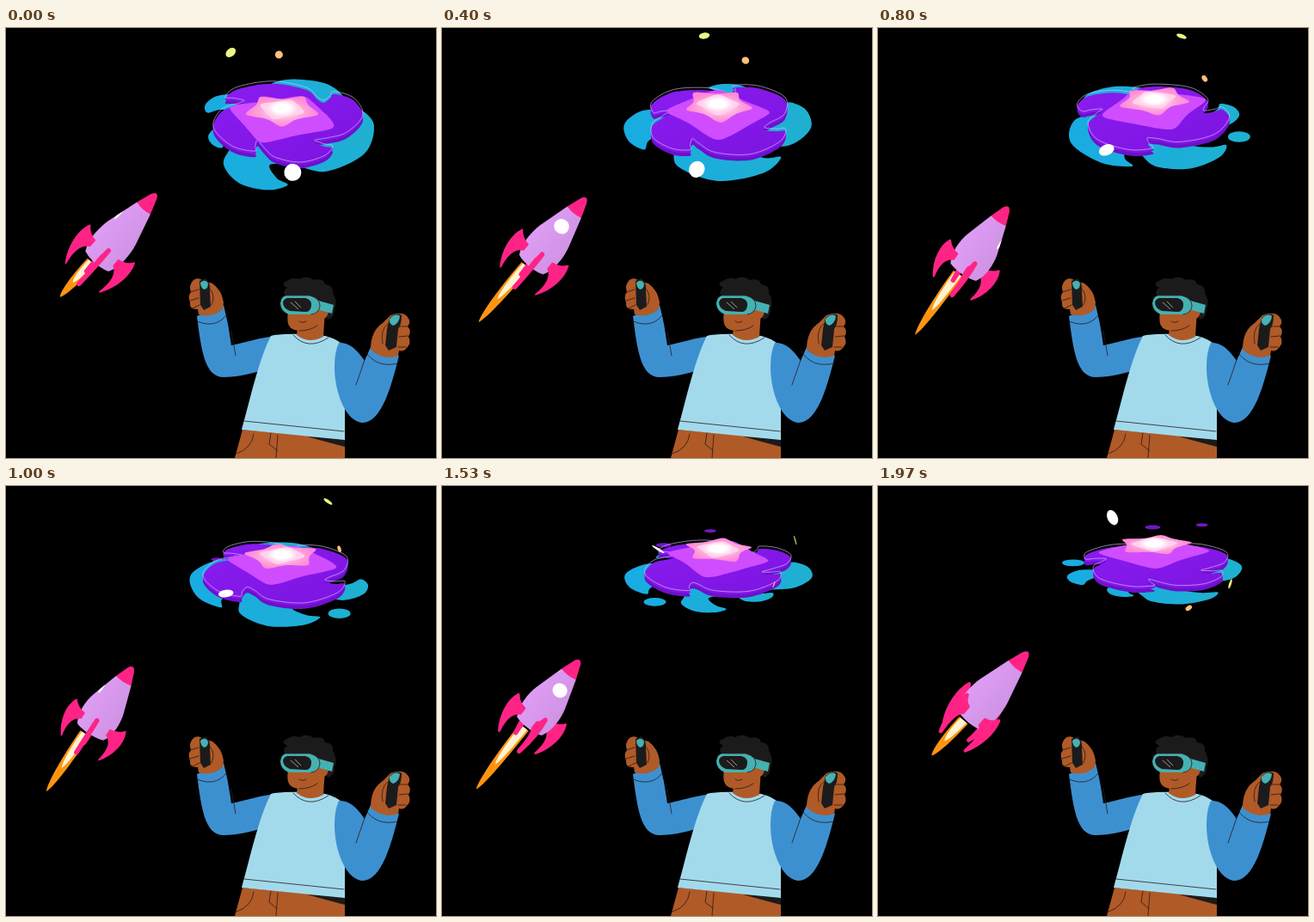
These frames come from a looping animation (500 by 500 pixels, 2.01 s). An HTML page:

```html
<!DOCTYPE html>
<html lang="en">
<head>
<meta charset="utf-8">
<title>Virtual space</title>
<style>
html, body { margin: 0; width: 100%; height: 100%; overflow: hidden; background: #000; }
svg { display: block; width: 100%; height: 100%; }
.line { fill: none; stroke: #2b1a1a; stroke-width: .8; stroke-linecap: round; stroke-linejoin: round; }
.skin { fill: #b05a27; }
.sleeve { fill: #3d90d0; }
.dark { fill: #1c1b1c; }
.teal { fill: #45b1b2; }
.fin { fill: #ff2386; stroke: #ff2386; stroke-linejoin: round; }
</style>
</head>
<body>
<svg viewBox="0 0 500 500">
  <defs>
    <linearGradient id="cyan" x1="0" y1="0" x2="1" y2="0">
      <stop offset="0" stop-color="#18ace2"/><stop offset="1" stop-color="#1fb0d0"/>
    </linearGradient>
    <linearGradient id="purple" x1="0" y1="0" x2="1" y2="1">
      <stop offset="0" stop-color="#8a1cf0"/><stop offset="1" stop-color="#7c14e0"/>
    </linearGradient>
    <radialGradient id="pink">
      <stop offset=".2" stop-color="#ffdcf0"/><stop offset=".6" stop-color="#ffa6dc"/><stop offset="1" stop-color="#ff86d4"/>
    </radialGradient>
    <radialGradient id="core">
      <stop offset=".5" stop-color="#fff"/><stop offset="1" stop-color="#fff" stop-opacity="0"/>
    </radialGradient>
    <linearGradient id="paint" x1="0" y1="0" x2="0" y2="1">
      <stop offset="0" stop-color="#de9cf4"/><stop offset="1" stop-color="#cf93e4"/>
    </linearGradient>
    <path id="hull" d="M0-18C12-25 30-24 42-21L78-10.500V10.500L42 21C30 24 12 25 0 18C-4 10-4-10 0-18Z"/>
    <clipPath id="hullClip"><use href="#hull"/></clipPath>
  </defs>

  <g id="galaxy">
    <ellipse id="driftA" rx="7" ry="2" fill="#6f17c4"/>
    <ellipse id="driftB" rx="9" ry="2.5" fill="#6f17c4"/>
    <path id="arms" fill="url(#cyan)"/>
    <path id="rim" fill="#6d10cc" transform="translate(0 4)"/>
    <path id="disc" fill="url(#purple)"/>
    <path id="edge" fill="none" stroke="#e6ccff" opacity=".6" transform="translate(0 -3)"/>
    <path id="cloud" fill="#cf4dff"/>
    <path id="glow" fill="url(#pink)"/>
    <path id="haze" fill="#ffd3ec"/>
    <ellipse id="heart" cx="321" rx="18" fill="url(#core)"/>
    <ellipse id="whiteMoon" fill="#fff"/>
    <ellipse id="yellowMoon" fill="#ebf587"/>
    <ellipse id="orangeMoon" fill="#ffc07c"/>
  </g>

  <g id="jet">
    <path id="flame" fill="#ff9412"/>
    <path id="flameCore" fill="#fff3cf"/>
  </g>
  <g id="rocket">
    <g id="backFins"></g>
    <use href="#hull" fill="url(#paint)"/>
    <g clip-path="url(#hullClip)"><ellipse id="port" cx="56" rx="8.5" fill="#fff"/></g>
    <path d="M78-10.500L95-4.500Q104 0 95 4.500L78 10.500Q75 0 78-10.500Z" fill="#ff2386"/>
    <g id="frontFins"></g>
  </g>

  <g id="player">
    <path class="skin" d="M275 467L266 500H394V478Z"/>
    <path class="dark" d="M350 475L394 478V487L368 480Z"/>
    <path class="line" d="M288 472Q286 489 268 495M308 471L306 484L315 491M316 473L314 500"/>
    <path class="sleeve" d="M222 335C227 374 231 406 253 406C270 406 284 402 298 398L314 358C294 360 278 366 262 369Q259 345 253 322Z"/>
    <path d="M312 357Q340 354 371 358Q381 360 392 368L384 410L394 442V479L274 467C284 432 293 388 308 358Z" fill="#a2daec"/>
    <path class="sleeve" d="M387 366C400 366 407 373 417 387L424 371L457 381C449 412 438 459 414 459C395 457 382 424 382 394Q382 377 387 366Z"/>
    <path class="line" d="M262 352L267 381M417 386L407 415M222 341Q244 350 256 334M418 376Q430 396 456 390M277 457L393 469"/>
    <path class="skin" d="M340 342L338 357Q352 368 369 359L371 328Z"/>
    <path class="line" d="M334 357Q351 376 375 360"/>
    <path class="skin" d="M328 329C326 344 328 351 341 352Q356 352 365 343L379 328L372 320L330 322Z"/>
    <path class="line" d="M341 341Q345 344 349 341M341 352Q354 352 362 346"/>
    <path class="dark" d="M326 313Q320 306 327 302Q318 297 327 294Q333 289 341 292Q350 287 358 293Q369 290 371 298Q381 299 380 308Q386 318 382 327Q382 337 374 339L366 323L355 313Z"/>
    <path class="skin" d="M364 327Q373 319 375 329Q374 340 365 338Z"/>
    <path class="teal" d="M356 315L381 322L379 332L361 327Z"/>
    <path class="teal" d="M326 311H353Q365 314 365 323Q364 332 355 333L329 333Q319 329 319 320Q320 312 326 311Z"/>
    <path class="dark" d="M327 314H348Q356 316 355 323Q354 331 347 330L330 329Q322 326 322 319Q323 315 327 314Z"/>
    <path d="M331 319L340 327M336 318L343 325" stroke="#bbb" stroke-width=".8"/>
    <path class="line" d="M326 311H353Q365 314 365 323Q364 332 355 333"/>

    <path class="skin" d="M218 293Q224 289 229 294L240 297Q251 305 253 319L252 327Q239 338 224 333L223 327Q213 328 214 319Q211 312 215 307Q212 299 218 293Z"/>
    <path class="dark" d="M225 294L232 291Q238 296 237 305L238 324L230 328L226 322Z"/>
    <path class="teal" d="M226 296Q232 291 235 297Q235 304 230 304Q226 301 226 296Z"/>
    <path class="line" d="M215 307L224 304M214 317L224 314M217 326L225 322M237 303Q244 311 239 322"/>

    <path class="skin" d="M424 374Q424 352 438 343L447 334Q460 329 466 335Q472 341 467 347Q472 352 468 359Q472 366 466 372Q462 377 457 375L456 381Q438 387 424 374Z"/>
    <path class="dark" d="M446 337Q454 330 460 334Q460 345 456 350L454 371L445 375L441 369L443 350Z"/>
    <path class="teal" d="M446 338Q453 331 458 335Q457 344 450 346Q445 344 446 338Z"/>
    <path class="line" d="M458 347H467M457 359L468 358M456 371L465 371M444 344Q435 350 438 367"/>
  </g>
</svg>
<script>
const LOOP = 2010;
const CX = 321;
const TAU = Math.PI * 2;
const rad = Math.PI / 180;
const sin = deg => Math.sin(deg * rad);
const cos = deg => Math.cos(deg * rad);
const $ = id => document.getElementById(id);
const set = (id, attrs) => { for (const k in attrs) $(id).setAttribute(k, attrs[k]); };

// Every shape of the galaxy is a list of [angle, radius] in its own plane.

// A hooked arm swells away from its root and curls back under its tip.
function hookedArms(arms, hook, waist) {
  return arms.flatMap(({ tip, span, reach }) => [
    [tip + span, reach * (waist + .05)],
    [tip + span * .8, reach * .87],
    [tip + span * .5, reach],
    [tip + span * .2, reach],
    [tip, reach * .91],
    [tip + hook * .5, reach * .8],
    [tip + hook, reach * waist]
  ]);
}

// Evenly spaced lobes, sheared so that they lean into the spin.
function swirl(lobes, size, wave, lean) {
  return Array.from({ length: lobes * 8 }, (_, i) => {
    const a = i * 45 / lobes;
    return [a + lean * cos(lobes * a), size + wave * sin(lobes * a) + wave * .4 * cos(2 * a)];
  });
}

const ARMS = hookedArms([
  { tip: 86, span: 62, reach: 109 },
  { tip: -23, span: 98, reach: 107 },
  { tip: -97, span: 72, reach: 108 },
  { tip: -161, span: 44, reach: 101 },
  { tip: -208, span: 36, reach: 87 }
], 16, .6);
const DISC = hookedArms([
  { tip: 115, span: 98, reach: 83 },
  { tip: 45, span: 63, reach: 92 },
  { tip: -45, span: 86, reach: 94 },
  { tip: -145, span: 95, reach: 89 }
], 6, .66);
const CLOUD = swirl(4, 54, 8, 7);
const GLOW = swirl(5, 36, 6, 5);
const HAZE = swirl(4, 23, 3, 6);

// Catmull-Rom curve through a closed ring of points.
function smooth(p) {
  const n = p.length;
  let d = `M${p[0]}`;
  for (let i = 0; i < n; i++) {
    const [a, b, c, e] = [p[(i + n - 1) % n], p[i], p[(i + 1) % n], p[(i + 2) % n]];
    d += `C${b.map((v, j) => v + (c[j] - a[j]) / 6)} ${c.map((v, j) => v - (e[j] - b[j]) / 6)} ${c}`;
  }
  return d + 'Z';
}

// Tilted plane; the near side looks a little deeper than the far side.
function project(angle, r, cy, tilt, depth = .12) {
  return [CX + r * cos(angle), cy + r * tilt * sin(angle) * (1 + depth * sin(angle))];
}

const plane = (shape, turn, cy, tilt) =>
  smooth(shape.map(([a, r]) => project(a + turn, r, cy, tilt)));

function oval(x, y, rx, ry) {
  return `M${x - rx} ${y}a${rx} ${ry} 0 1 0 ${2 * rx} 0a${rx} ${ry} 0 1 0 ${-2 * rx} 0Z`;
}

// Flat moons tumble as they orbit: flip is the angle of their face.
function moon(id, size, angle, a, b, cy, flip, lean) {
  const [x, y] = project(angle, a, cy, b / a, 0);
  set(id, {
    rx: size * (.8 + .2 * Math.abs(cos(flip))),
    ry: Math.max(.08, Math.abs(cos(flip))) * size,
    transform: `translate(${x} ${y}) rotate(${angle + lean})`
  });
}

function drift(id, angle, b, cy, visible) {
  const [x, y] = project(angle, 85, cy, b / 85, 0);
  set(id, { cx: x, cy: y, opacity: visible ? 1 : 0 });
}

function drawGalaxy(s) {
  const armTurn = 160 * s, turn = 170 * s;
  const armY = 116 - 7 * s, armTilt = .6 - .15 * s;
  const [x, y] = project(armTurn - 110, 104, armY, armTilt);
  const drop = s > .7 ? oval(x, y, 13, 13 * armTilt) : '';
  set('arms', { d: plane(ARMS, armTurn, armY, armTilt) + drop });

  const disc = plane(DISC, turn, 106 - 7 * s, .53 - .11 * s);
  for (const id of ['rim', 'disc', 'edge']) set(id, { d: disc });
  const rise = 13.5 * s;
  set('cloud', { d: plane(CLOUD, turn, 103 - rise, .49 - .1 * s) });
  set('glow', { d: plane(GLOW, turn, 94 - rise, .47 - .09 * s) });
  set('haze', { d: plane(HAZE, turn, 93.5 - rise, .48 - .08 * s) });
  set('heart', { cy: 93.5 - rise, ry: 10 - 1.5 * s });

  drift('driftA', 107 * s - 260, 30, 131 - 32 * s, s > .9);
  drift('driftB', 107 * s - 302, 20, 131 - 32 * s, s > 1.5);

  const spin = 75 * s;
  moon('whiteMoon', 10, 80 + spin, 72, 76, 93, 64 * s, -163);
  moon('yellowMoon', 7, spin - 130, 93, 75 + 8 * s, 86, 48 + 27 * s, 90);
  moon('orangeMoon', 4.5, spin - 93, 70, 61, 92, 64 * s, 90);
}

function fin(angle) {
  const q = sin(angle), front = cos(angle), shift = -8 * front;
  const at = (x, y) => `${x + shift} ${y * q}`;
  return `<path class="fin" stroke-width="${1.5 + 4 * Math.abs(front)}" d="M${at(16, 18)}Q${at(17, 28)} ${at(25, 34)}` +
    `C${at(12, 40)} ${at(-8, 37)} ${at(-24, 26)}C${at(-10, 29)} ${at(3, 28)} ${at(8, 18)}Z"/>`;
}

const jet = (w, reach) =>
  `M-5 ${-4 - w}C${-5 - reach * .4} ${-5 - w} ${-reach * .9} ${-5 - w * .7} ${-reach} -5` +
  `C${-reach * .9} ${-5 + w * .7} ${-5 - reach * .4} ${-5 + w} -5 ${-4 + w}Z`;

function drawRocket(t) {
  const sway = t / LOOP * TAU;
  const swing = Math.cos(sway - .16);
  const tip = [161.5 + 14 * swing, 201 - 9 * swing];
  const tail = [102 + 4 * swing, 278.5 - 7.5 * swing];
  const [dx, dy] = [tip[0] - tail[0], tip[1] - tail[1]];
  const len = Math.hypot(dx, dy);
  const place = `translate(${tail}) rotate(${Math.atan2(dy, dx) / rad})`;
  set('rocket', { transform: `${place} scale(${len / 100} 1)` });
  set('jet', { transform: place });

  // One roll per half loop: it lingers with the porthole in view, then whips round.
  const p = t / LOOP * 2 % 1;
  const roll = 3 + 360 * p - 110 * Math.sin(Math.PI * p * p);
  const fins = [0, 90, 180, 270].map(a => a + roll);
  const inFront = a => cos(a) > -.1;
  $('backFins').innerHTML = fins.filter(a => !inFront(a)).map(fin).join('');
  $('frontFins').innerHTML = fins.filter(inFront).map(fin).join('');

  const face = roll - 97;
  set('port', {
    cy: 17 * sin(face),
    ry: Math.max(1.5, 9 * cos(face)),
    opacity: cos(face) > -.15 ? 1 : 0
  });

  const reach = 85 - 13 * Math.cos(sway) - 12 * Math.cos(2 * sway);
  set('flame', { d: jet(6.5, reach) });
  set('flameCore', { d: jet(4.5, reach * .62) });
}

const start = performance.now();
function tick() {
  const t = (performance.now() - start) % LOOP;
  drawGalaxy(t / 1000);
  drawRocket(t);
  requestAnimationFrame(tick);
}
tick();
</script>
</body>
</html>
```
